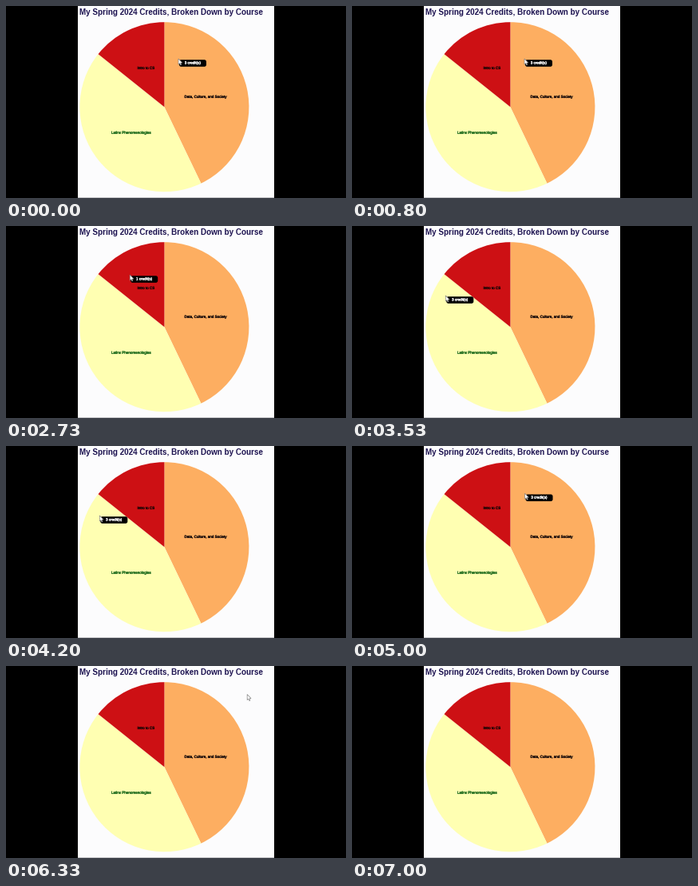
These frames come from a looping animation (426 by 240 pixels, 7070 ms). A matplotlib script:

```python
import math

import matplotlib.pyplot as plt
from matplotlib.animation import FuncAnimation
from matplotlib.patches import FancyBboxPatch, Polygon, Rectangle, Wedge
from matplotlib.patheffects import withStroke

W, H, DPI = 426, 240, 64
FRAMES, STEP = 101, 70
CX, CY, R = 198.4, 126.2, 106
COURSES = [
    ("Data, Culture, and Society", 3, "#fdae61", "#140a0a"),
    ("Latinx Phenomenologies", 3, "#ffffb2", "#1c6a1c"),
    ("Intro to CS", 1, "#cd1014", "#1a0505"),
]
TOTAL = sum(c[1] for c in COURSES)

# Mouse moves: start ms, end ms, destination
START = (216, 66)
MOVES = [
    (1130, 1600, (175, 47.5)),
    (2470, 3130, (117.3, 87)),
    (4600, 5270, (289, 39)),
    (6130, 6670, (345, 24)),
]
ARROW = [(0, 0), (0, 7), (1.6, 5.6), (2.7, 8), (3.8, 7.5), (2.8, 5.2), (4.9, 5)]

plt.rcParams["font.family"] = "Liberation Sans"
fig = plt.figure(figsize=(W / DPI, H / DPI), dpi=DPI, facecolor="black")
ax = fig.add_axes([0, 0, 1, 1])
ax.set(xlim=(0, W), ylim=(H, 0))
ax.axis("off")


def label(x, y, s, px, color, **kw):
    return ax.text(x, y, s, fontsize=px * 72 / DPI, va="baseline",
                   color=color, **kw)


def small(x, y, s, color, **kw):
    """Tiny centred text, thickened a little so it stays legible."""
    edge = [withStroke(linewidth=0.35, foreground=color)]
    return label(x, y, s, 4.54, color, ha="center", path_effects=edge, **kw)


def mouse(t):
    x, y = START
    for t0, t1, (x1, y1) in MOVES:
        u = min(max((t - t0) / (t1 - t0), 0), 1)
        u = u * u * (3 - 2 * u)
        x, y = x + (x1 - x) * u, y + (y1 - y) * u
    return x, y


def credits_at(x, y):
    """Credits of the slice under the point, or None outside the pie."""
    dx, dy = x - CX, CY - y
    if math.hypot(dx, dy) > R:
        return None
    share = math.atan2(dx, dy) / (2 * math.pi) % 1 * TOTAL
    for _, n, _, _ in COURSES:
        if share < n:
            return n
        share -= n


panel = ax.add_patch(Rectangle((90, 0), 246, H, fc="#fcfcfd", lw=0))
ax.add_patch(Rectangle((90, 239), 246, 1, fc="#c4c4c8", lw=0))
label(92, 11, "My Spring 2024 Credits, Broken Down by Course", 9.9,
      "#1c1250", weight="bold")

angle = 0
for name, n, fill, ink in COURSES:
    sweep = 360 * n / TOTAL
    # The y axis points down, so angles grow clockwise from the top
    ax.add_patch(Wedge((CX, CY), R, angle - 90, angle + sweep - 90, fc=fill, lw=0))
    mid = math.radians(angle + sweep / 2)
    small(CX + R / 2 * math.sin(mid), CY - R / 2 * math.cos(mid) + 0.5,
          name, ink, zorder=3)
    angle += sweep

tip = ax.add_patch(FancyBboxPatch((0, 0), 34, 8.6, fc="black", lw=0, zorder=4,
                                  boxstyle="round,pad=0,rounding_size=2.5"))
tip_text = small(0, 0, "", "white", zorder=5)
arrow = ax.add_patch(Polygon(ARROW, fc="white", ec="#777777", lw=0.7, zorder=6))
arrow.set_clip_path(panel)


def update(i):
    x, y = mouse(i * STEP)
    n = credits_at(x, y)
    tip.set_visible(n is not None)
    tip_text.set_visible(n is not None)
    tip.set_x(x + 1)
    tip.set_y(y + 1.2)
    tip_text.set_position((x + 18, y + 6.4))
    tip_text.set_text(f"{n} credit(s)")
    arrow.set_xy([(x + px, y + py) for px, py in ARROW])
    return tip, tip_text, arrow


anim = FuncAnimation(fig, update, frames=FRAMES, interval=STEP, repeat=True,
                     repeat_delay=0)
plt.show()
```
